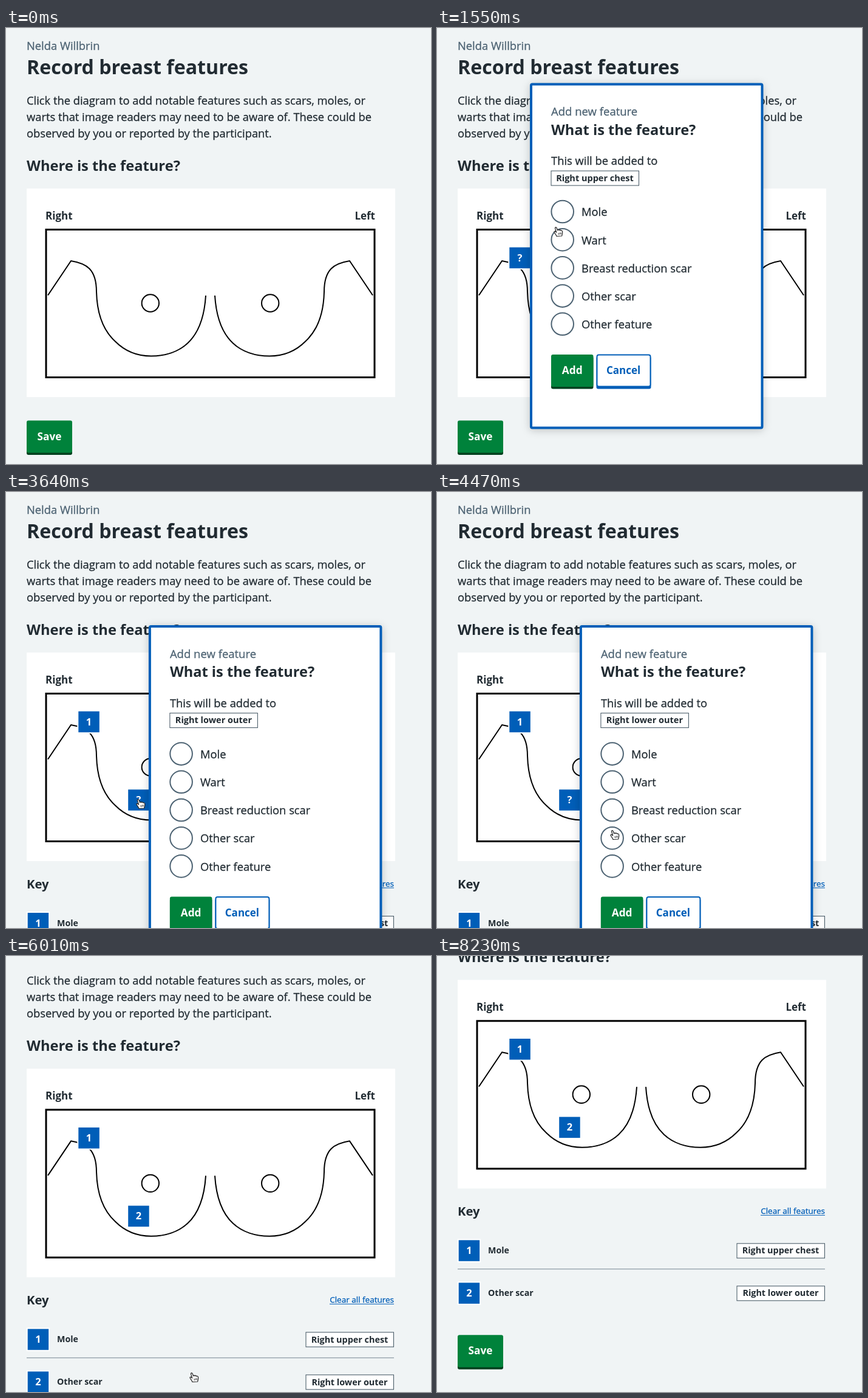
Write an HTML page that moves like this. It is 700 px wide and 717 px high and loops after 8.36 s.

```html
<!DOCTYPE html>
<html lang="en">
<head>
<meta charset="utf-8">
<title>Record breast features</title>
<style>
  html, body { margin: 0; height: 100%; overflow: hidden; background: #f0f4f5; }
  svg { display: block; font: 18.34px "Open Sans", "Noto Sans", sans-serif; color: #212b32; }
  text, .white, .blue { fill: currentColor; }
  text:not(.bold) { stroke: currentColor; stroke-width: .3px; }
  .bold { font-weight: 700; }
  .mid { text-anchor: middle; }
  .end { text-anchor: end; }
  .grey { color: #4c6272; }
  .white { color: #fff; }
  .blue { color: #005eb8; }
  .line { fill: none; stroke: #000; stroke-width: 2; }
  #modal { filter: drop-shadow(0 2px 7px #0003); }
</style>
</head>
<body>
<svg id="stage" width="700" height="717" viewBox="0 0 700 717"></svg>
<script>
const LOOP = 8360;
const $ = id => document.getElementById(id);

const text = (x, y, s, size = 18.34, cls = '') =>
  `<text x="${x}" y="${y}" font-size="${size}" class="${cls}">${s}</text>`;

const rect = (x, y, w, h, attrs = '') =>
  `<rect x="${x}" y="${y}" width="${w}" height="${h}" ${attrs}/>`;

const marker = (x, y, s) =>
  rect(x - 2, y - 2, 38.5, 38.5, 'class="white"') + rect(x, y, 34.5, 34.5, 'class="blue"') +
  text(x + 17.2, y + 22.8, s, 16.5, 'bold mid white');

const tag = (x, y, s, size = 14.4, id = '') =>
  rect(x + .5, y + .5, 144.5, 24, 'fill="#fff" stroke="#3f525f"') +
  `<text id="${id}" x="${x + 72.5}" y="${y + 17.2}" font-size="${size}" class="bold mid">${s}</text>`;

const button = (x, y, w, s) =>
  rect(x, y + 3, w, 53.5, 'rx="3" fill="#00401e"') + rect(x, y, w, 53, 'rx="3" fill="#00823b"') +
  text(x + w / 2, y + 32.2, s, 17.3, 'bold mid white');

const keyRow = (n, y, label, place) =>
  marker(35.7, y, n) + text(84, y + 21.7, label, 14.2, 'bold') + tag(493.5, y + 5, place);

const torso = `<path class="line" d="M69 439.5L107 383C132 387 149 396 149 434
  C150 474 163 500 180 515.5C197 532.5 218 539.5 239 539.5
  C262 539.5 284 532.5 299 518.5C318 501 327 472 329 440"/>
  <circle class="line" cx="237.8" cy="452.5" r="14.2"/>`;

const options = ['Mole', 'Wart', 'Breast reduction scar', 'Other scar', 'Other feature'];

const page = text(34, 35.5, 'Nelda Willbrin', 18.34, 'grey') +
  text(34, 75.5, 'Record breast features', 32.15, 'bold') +
  text(34, 126, 'Click the diagram to add notable features such as scars, moles, or') +
  text(34, 153, 'warts that image readers may need to be aware of. These could be') +
  text(34, 180, 'observed by you or reported by the participant.') +
  text(34, 234.5, 'Where is the feature?', 23.7, 'bold') +
  rect(34, 264, 607, 343, 'class="white"') +
  text(65, 314.7, 'Right', 17, 'bold') + text(608, 314.7, 'Left', 17, 'bold end') +
  rect(66, 331.5, 541, 243, 'fill="none" stroke="#000" stroke-width="3"') +
  torso + `<g transform="translate(673) scale(-1 1)">${torso}</g>` +
  `<g id="pin1">${marker(119.3, 360.7, '1')}</g>` +
  `<g id="pin2">${marker(201.2, 489.3, '2')}</g>` +
  `<g id="key">` + text(34, 652, 'Key', 20.3, 'bold') +
  text(639, 649, 'Clear all features', 13.5, 'blue end') +
  rect(533, 650.5, 106, 1, 'class="blue"') +
  keyRow(1, 692, 'Mole', 'Right upper chest') + `</g>` +
  `<g id="row2">` + rect(34, 739, 605, 1, 'fill="#768692"') +
  keyRow(2, 762, 'Other scar', 'Right lower outer') + `</g>` +
  `<g id="save">${button(34, 645.5, 75, 'Save')}</g>`;

const dialog = rect(155, 92.5, 380.5, 565, 'rx="2" fill="#fff" stroke="#005eb8" stroke-width="4"') +
  text(188, 144.3, 'Add new feature', 18.5, 'grey') +
  text(188, 175.7, 'What is the feature?', 23.6, 'bold') +
  text(188, 225, 'This will be added to') +
  tag(187.5, 234.5, '', 14.5, 'place') +
  options.map((s, i) => {
    const y = 302 + 46.2 * i;
    return `<circle cx="206.7" cy="${y}" r="18.3" fill="#fff" stroke="#4c6272" stroke-width="2"/>` +
      text(238, y + 7.3, s);
  }).join('') +
  `<circle id="dot" cx="206.7" r="9.5" fill="#212b32"/>` +
  button(188, 537, 69.5, 'Add') +
  rect(262.5, 540, 90, 53.5, 'rx="3" class="blue"') +
  rect(263.5, 537.5, 88, 52, 'rx="3" fill="#fff" stroke="#005eb8" stroke-width="2"') +
  text(307, 569.2, 'Cancel', 17, 'bold mid blue');

const hand = `<path fill="#fff" stroke="#222" stroke-width="1.2" stroke-linejoin="round"
  d="M-3 7.5C-4 4-7 2-7 .2C-6.8-1.2-5-.8-3.4 1L-5.4-5.4C-6-7.6-3.6-8.2-2.9-6.2L-1.4-2.2
  C-1-3.8 1-3.6 1.3-2.2C1.9-3.6 3.6-3.2 3.9-1.7C4.8-2.6 6.2-2 6.5-.6C7.2 2.4 6 4.2 5.6 7Z"/>
  <path fill="none" stroke="#222" stroke-width=".9" d="M0 2l.6 3M2.2 1.5l.5 3M4.2 1.2l.2 3"/>`;

$('stage').innerHTML = `<g id="page">${page}</g>
  <g id="pending">${marker(119.3, 360.7, '?')}</g>
  <g id="modal">${dialog}</g><g id="cursor">${hand}</g>`;

// [time, x, y]
const pointer = [
  [70, 420, 730], [900, 140, 385], [1230, 140, 385], [1550, 200, 335], [1760, 209, 309],
  [1980, 209, 309], [2450, 231, 573], [2850, 231, 573], [3400, 222, 513], [3750, 222, 513],
  [4430, 293, 564], [4620, 293, 564], [4970, 310, 693], [6010, 310, 693], [6300, 312, 730]
];
// [time, offset]
const scroll = [[5740, 0], [6010, 78.5], [6380, 143], [6750, 189], [7160, 215], [7340, 215], [7960, 224.7]];

const smooth = p => p * p * (3 - 2 * p);

function at(keys, t, ease = p => p) {
  if (t <= keys[0][0]) return keys[0].slice(1);
  const i = keys.findIndex(k => k[0] > t);
  if (i < 0) return keys[keys.length - 1].slice(1);
  const a = keys[i - 1], b = keys[i];
  const p = ease((t - a[0]) / (b[0] - a[0]));
  return a.slice(1).map((v, j) => v + (b[j + 1] - v) * p);
}

const show = (id, on) => $(id).setAttribute('display', on ? 'inline' : 'none');
const move = (id, x, y) => $(id).setAttribute('transform', `translate(${x} ${y})`);

// open: dialog appears, pick: radio chosen, add: dialog closes
const visits = [
  { open: 1200, pick: 1850, add: 2600, x: 0, y: 0, place: 'Right upper chest', option: 0 },
  { open: 3600, pick: 4560, add: 5190, x: 81.9, y: 128.6, place: 'Right lower outer', option: 3 }
];

function draw(t) {
  const [first, second] = visits;
  const visit = visits.find(v => t >= v.open && t < v.add);
  show('modal', visit);
  show('pending', visit);
  if (visit) {
    move('modal', visit.x, visit.y);
    move('pending', visit.x, visit.y);
    $('place').textContent = visit.place;
    $('dot').setAttribute('cy', 302 + 46.2 * visit.option);
    show('dot', t >= visit.pick);
  }
  const one = t >= first.add, two = t >= second.add;
  show('pin1', one);
  show('key', one);
  show('pin2', two);
  show('row2', two);
  move('save', 0, two ? 202.5 : one ? 132.5 : 0);
  move('page', 0, -at(scroll, t)[0]);
  show('cursor', t >= 70 && t < 6300);
  move('cursor', ...at(pointer, t, smooth));
}

function frame() {
  draw(performance.now() % LOOP);
  requestAnimationFrame(frame);
}
frame();
</script>
</body>
</html>
```
